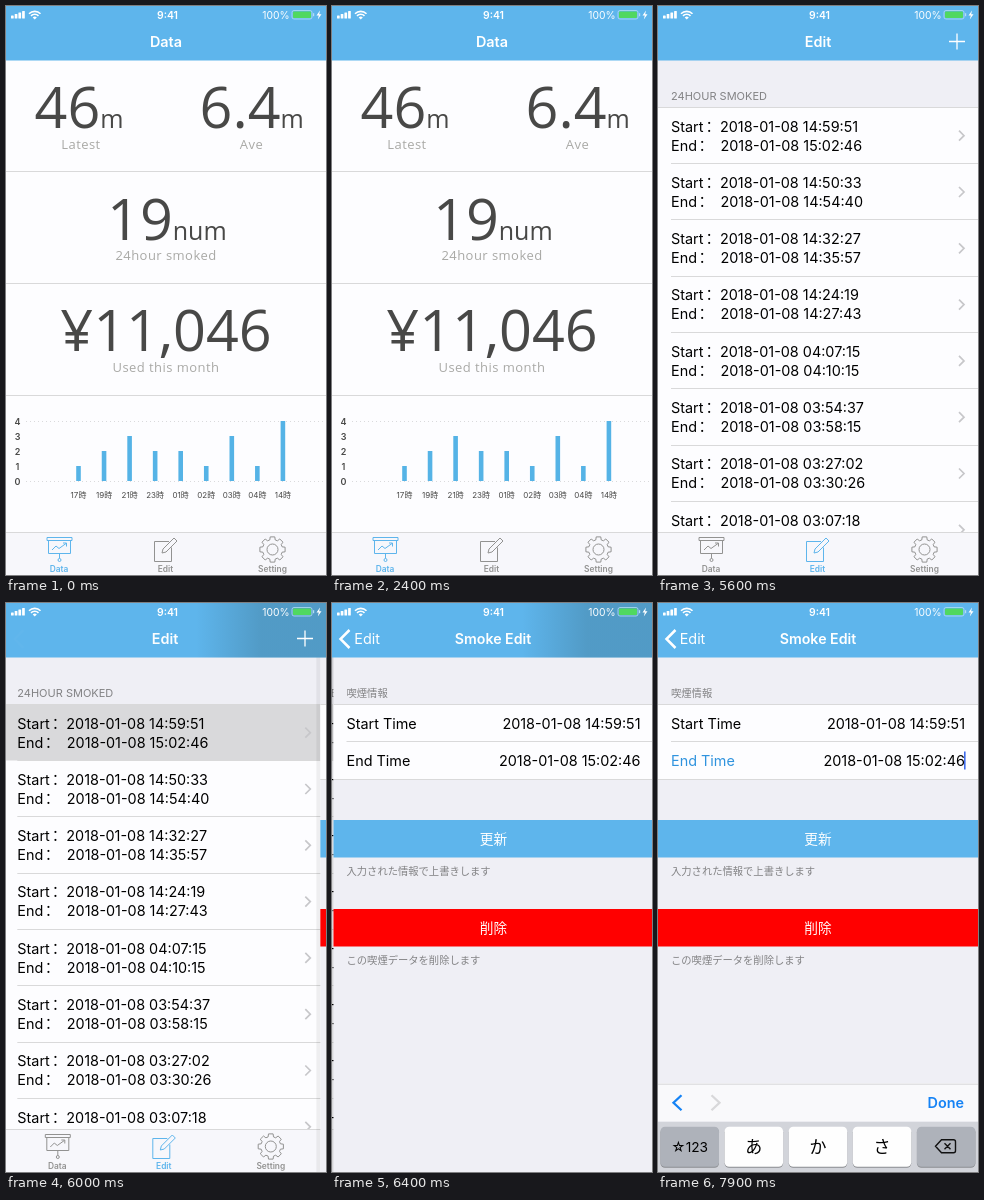
Animation of 320 by 569 pixels, one loop 8 s. Source, as an HTML page:

```html
<!DOCTYPE html>
<html lang="ja">
<head>
<meta charset="utf-8">
<style>
html, body { margin: 0; width: 100%; height: 100%; overflow: hidden; background: #fdfdff; }
svg { display: block; width: 320px; height: 569px; font-family: Inter, "Noto Sans CJK JP", sans-serif; font-size: 14.4px; }
.big { font-family: "Open Sans", sans-serif; font-size: 57.5px; }
.label { font-family: "Open Sans", sans-serif; font-size: 13px; letter-spacing: .45px; }
</style>
</head>
<body>
<svg id="stage" viewBox="0 0 320 569"></svg>
<script>
const BLUE = '#5eb5ec', PAGE = '#fdfdff', PALE = '#efeff5', LINE = '#d9d9da', GREY = '#828284', INK = '#484847';
const LOOP = 8000, STEP = 100;
const TAB_AT = 3100, TAP_AT = 5900, PUSH_AT = 5989, SETTLED_AT = 6700, FOCUS_AT = 7800, KEYS_AT = 7825;

const text = (x, y, s, fill = '#000', more = '') => `<text x="${x}" y="${y}" fill="${fill}" ${more}>${s}</text>`;
const mid = (x, y, s, fill, more = '') => text(x, y, s, fill, 'text-anchor="middle" ' + more);
const end = (x, y, s, fill, more = '') => text(x, y, s, fill, 'text-anchor="end" ' + more);
const rect = (x, y, w, h, fill, more = '') => `<rect x="${x}" y="${y}" width="${w}" height="${h}" fill="${fill}" ${more}/>`;
const path = (d, stroke, width = 1, more = '') => `<path d="${d}" fill="none" stroke="${stroke}" stroke-width="${width}" ${more}/>`;
const group = (id, body) => `<g id="${id}">${body}</g>`;
const size = n => `style="font-size:${n}px"`;
const bold = n => `style="font-size:${n}px;font-weight:600"`;

function gear(cx, cy) {
  const pts = [];
  for (let i = 0; i < 8; i++)
    for (const [da, r] of [[-.27, 10], [-.18, 12.8], [.18, 12.8], [.27, 10]]) {
      const a = i * Math.PI / 4 + da;
      pts.push((cx + r * Math.cos(a)).toFixed(1) + ' ' + (cy + r * Math.sin(a)).toFixed(1));
    }
  return `M${pts.join('L')}Z M${cx - 5.5} ${cy}a5.5 5.5 0 1 0 11 0a5.5 5.5 0 1 0 -11 0`;
}

function tabBar(active) {
  const icons = [
    'M41 531.5h25v3h-25z M42.5 534.5v13h22v-13 M46 544l4-4 3 2.5 7-5 M57 537h3.5v3.5 M53.5 547.5v5 M52 554a1.5 1.5 0 1 0 3 0a1.5 1.5 0 1 0 -3 0',
    'M163 535.5h-14.5v20h17v-14 M156 547l1-4 11-11 3 3 -11 11z',
    gear(266.5, 543.5)];
  return rect(0, 526, 320, 43, '#f7f7fb') + rect(0, 526, 320, 1, LINE) +
    ['Data', 'Edit', 'Setting'].map((name, i) => {
      const color = i == active ? BLUE : '#929291';
      return path(icons[i], color) + mid([53, 159.5, 266.5][i], 566, name, color, bold(8.4));
    }).join('');
}

function dataScreen() {
  const unit = s => `<tspan font-size="25">${s}</tspan>`;
  const big = (x, y, s) => text(x, y, s, INK, 'class="big"');
  const label = (x, y, s) => mid(x, y, s, '#a9a9a6', 'class="label"');
  const bars = [1, 2, 3, 2, 2, 1, 3, 1, 4];
  const hours = [17, 19, 21, 23, '01', '02', '03', '04', 14];
  let s = rect(0, 0, 320, 569, PAGE) +
    [165, 277, 389].map(y => rect(0, y, 320, 1, LINE)).join('') +
    big(28.5, 122, '46' + unit('m')) + label(75, 142.5, 'Latest') +
    big(193.5, 122, '6.4' + unit('m')) + label(245.5, 142.5, 'Ave') +
    big(101, 234, '19' + unit('num')) + label(160, 254, '24hour smoked') +
    mid(160, 345, '¥11,046', INK, 'class="big"') + label(160, 366, 'Used this month');
  for (let i = 0; i < 5; i++) s += mid(11.5, 478.5 - 15 * i, i, INK, bold(9));
  for (const y of [415.5, 475.5]) s += path(`M20 ${y}H320`, '#dadadc', 1, 'stroke-dasharray="1 3"');
  bars.forEach((n, i) => {
    const x = 72.5 + 25.55 * i;
    s += rect(x - 2.3, 475 - 15 * n, 4.6, 15 * n, '#55b3e6') + mid(x, 492, hours[i] + '時', INK, size(8));
  });
  return s + tabBar(0);
}

function listScreen() {
  const times = ['14:59:51 15:02:46', '14:50:33 14:54:40', '14:32:27 14:35:57', '14:24:19 14:27:43',
    '04:07:15 04:10:15', '03:54:37 03:58:15', '03:27:02 03:30:26', '03:07:18 03:10:42'];
  let s = rect(0, 0, 320, 569, PAGE) + rect(0, 54, 320, 47.5, PALE) +
    text(13, 93.5, '24HOUR SMOKED', GREY, size(11)) + rect(0, 101, 320, 1, LINE) +
    rect(0, 101.5, 320, 56, '#d9d9db', 'id="tapped"');
  times.forEach((pair, i) => {
    const y = 101 + 56.3 * i, [from, to] = pair.split(' ');
    s += text(13, y + 24.5, 'Start') + text(44, y + 24.5, '：') + text(62, y + 24.5, '2018-01-08 ' + from) +
      text(13, y + 43.5, 'End') + text(37, y + 43.5, '：') + text(62.5, y + 43.5, '2018-01-08 ' + to) +
      path(`M301 ${y + 23.7}l5 5 -5 5`, '#c7c7ca', 1.7) + rect(13, Math.round(y + 56), 307, 1, LINE);
  });
  return s + tabBar(1) + rect(0, 54, 320, 515, '#000', 'id="dim"');
}

function detailScreen() {
  const button = (y, fill, name, note) => rect(0, y, 320, 37.5, fill) + mid(160, y + 23.5, name, '#fff', size(13.7)) +
    text(13, y + 54.5, note, GREY, size(10.3));
  return rect(-4, 54, 4, 515, '#000', 'opacity=".06"') + rect(0, 54, 320, 515, PALE) +
    text(13, 93.5, '喫煙情報', GREY, size(10.3)) +
    rect(0, 101, 320, 75, PAGE) + [101, 176].map(y => rect(0, y, 320, 1, LINE)).join('') + rect(13, 138, 307, 1, LINE) +
    text(13, 125.5, 'Start Time') + end(307, 125.5, '2018-01-08 14:59:51') +
    text(13, 162.5, 'End Time', '#000', 'id="endLabel"') + end(307, 162.5, '2018-01-08 15:02:46') +
    rect(306, 148.5, 1.6, 18, '#3f6cec', 'id="caret"') +
    button(217, BLUE, '更新', '入力された情報で上書きします') +
    button(306, '#f00', '削除', 'この喫煙データを削除します');
}

function keyboard() {
  let s = rect(0, 0, 320, 38, '#f9f9fb') + rect(0, 0, 320, 1, LINE) + rect(0, 38, 320, 184, '#d2d4da') +
    path('M23.5 11.5l-8 7.5 8 7.5', '#1583f5', 2.3) + path('M53.5 11.5l8 7.5 -8 7.5', '#d8d8da', 2.3) +
    end(306, 24, 'Done', '#1583f5', bold(14.4));
  ['☆123', 'あ', 'か', 'さ', ''].forEach((key, i) => {
    const x = 2.5 + 64.1 * i, side = i % 4 == 0;
    s += rect(x, 44, 58.5, 40, '#8b8d91', 'rx="4.5"') + rect(x, 43, 58.5, 40, side ? '#aeb2ba' : '#fefefe', 'rx="4.5"') +
      mid(x + 29.2, side ? 68 : 69, key, '#000', size(side ? 13.7 : 17));
  });
  return s + path('M277.5 62.5l6-6.5h12a2 2 0 0 1 2 2v9a2 2 0 0 1 -2 2h-12z M286.5 59.5l6 6 M292.5 59.5l-6 6', '#111', 1.4);
}

const navBar = () => rect(0, 0, 320, 54.5, BLUE) +
  '<linearGradient id="shadow"><stop offset="0" stop-color="#3a6a80" stop-opacity="0"/>' +
  '<stop offset=".5" stop-color="#3a6a80" stop-opacity=".35"/></linearGradient>' +
  rect(190, 0, 130, 54.5, 'url(#shadow)', 'id="shade"') +
  mid(160, 41, 'Data', '#fff', 'id="dataTitle" ' + bold(14.4)) +
  mid(160, 41, 'Edit', '#fff', 'id="listTitle" ' + bold(14.4)) +
  mid(160, 41, 'Smoke Edit', '#fff', 'id="detailTitle" ' + bold(14.2)) +
  mid(34.5, 41, 'Edit', '#fff', 'id="backLabel"') +
  path('M17.5 27l-9 9 9 9', '#fff', 2.5, 'id="backArrow"') +
  path('M291 35.5h16 M299 27.5v16', '#fff', 1.3, 'id="plus"');

function statusBar() {
  let s = '';
  for (let i = 0; i < 4; i++) s += rect(5 + 3.7 * i, 9.5 - 1.5 * i, 2.7, 3 + 1.5 * i, '#fff', 'rx=".5"');
  return s + path('M23 7.8a8 8 0 0 1 11.5 0 M25 9.9a5.2 5.2 0 0 1 7.5 0', '#fff', 1.6) +
    '<path d="M26.7 11.4a3 3 0 0 1 4.1 0l-2.05 2z" fill="#fff"/>' +
    mid(161.5, 12.5, '9:41', '#fff', bold(10.4)) + end(283.5, 12.5, '100%', '#fff', size(10.3)) +
    rect(286, 4.5, 20, 8.5, 'none', 'rx="2" stroke="#b4dcf6" stroke-width=".8"') +
    rect(287, 5.5, 18, 6.5, '#50d860', 'rx="1"') + rect(307, 7.2, 1.2, 3, '#b4dcf6') +
    '<path d="M314 4.5l-3.5 5h2.3l-1 4 3.7-5.2h-2.3z" fill="#fff"/>';
}

document.getElementById('stage').innerHTML =
  group('data', dataScreen()) + group('list', listScreen()) + group('detail', detailScreen()) +
  navBar() + statusBar() + group('keys', keyboard());

const el = id => document.getElementById(id);
const fade = (id, a) => el(id).setAttribute('opacity', a);
const show = (id, on) => el(id).setAttribute('visibility', on ? 'visible' : 'hidden');
const move = (id, x, y = 0) => el(id).setAttribute('transform', `translate(${x.toFixed(2)} ${y.toFixed(2)})`);

// Critically damped spring, 0 to 1
function spring(ms) {
  const x = Math.max(0, ms) * .01826;
  return 1 - (1 + x) * Math.exp(-x);
}

function draw() {
  const now = performance.now() % LOOP, t = Math.floor(now / STEP) * STEP;
  const onData = t < TAB_AT, p = spring(t - PUSH_AT), k = spring(t - KEYS_AT);
  const slide = 125.5 * p ** 1.2;

  show('data', onData);
  show('dataTitle', onData);
  show('list', !onData);
  show('detail', p > 0);
  show('tapped', t >= TAP_AT);
  show('shade', p > 0 && t < SETTLED_AT);
  show('caret', t >= FOCUS_AT);
  show('keys', k > 0);
  el('endLabel').setAttribute('fill', t >= FOCUS_AT ? '#2f93de' : '#000');

  move('list', -96 * p);
  move('detail', 320 * (1 - p));
  move('listTitle', -slide);
  move('backLabel', 125.5 - slide);
  move('detailTitle', 217 * (1 - p));
  move('keys', 0, 569 - 222 * k);

  fade('dim', .1 * p);
  fade('listTitle', onData ? 0 : 1 - p);
  fade('plus', onData ? 0 : 1 - p ** 2);
  for (const id of ['backLabel', 'backArrow', 'detailTitle']) fade(id, p);
  requestAnimationFrame(draw);
}
draw();
</script>
</body>
</html>
```
